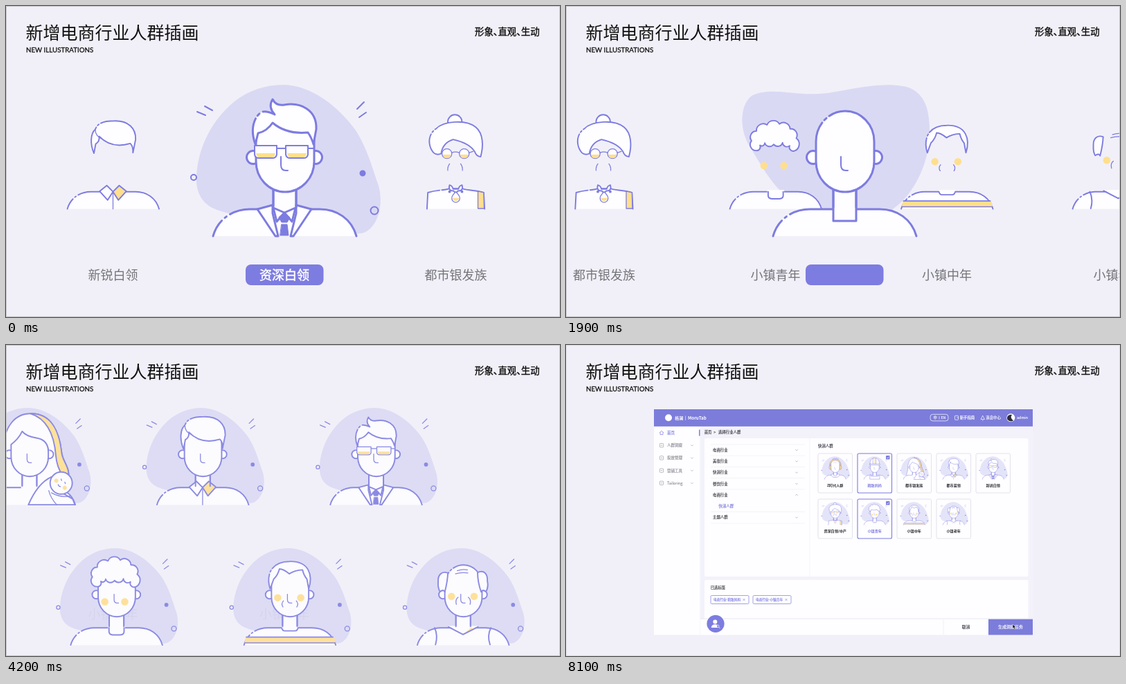
Animation of 800 by 450 pixels, one loop 8.2 s. Source, as an HTML page:

```html
<!DOCTYPE html>
<html lang="zh-CN">
<head>
<meta charset="utf-8">
<title>人群插画</title>
<style>
html, body { margin: 0; width: 100%; height: 100%; overflow: hidden; background: #f1f0f8; }
svg { display: block; width: 800px; height: 450px; }
text { font-family: "Noto Sans CJK SC", "Noto Sans CJK", "Noto Sans", sans-serif; stroke: none; }
.latin { font-family: Lato, sans-serif; }
</style>
</head>
<body>
<svg id="stage" viewBox="0 0 800 450" xmlns="http://www.w3.org/2000/svg"></svg>
<script>
const LOOP = 8200, P = '#7d7ce0', Y = '#ffdf8e', W = '#fefdff';
const clamp = v => Math.max(0, Math.min(1, v));
const inOut = v => v < .5 ? 4 * v ** 3 : 1 - (2 - 2 * v) ** 3 / 2;

// Markup helpers
const path = (d, fill = W, more = '') => `<path d="${d}" fill="${fill}" ${more}/>`;
const flat = (d, fill = W) => path(d, fill, 'stroke="none"');
const line = (d, w = 2) => path(d, 'none', `stroke-width="${w}"`);
const dot = (x, y, r, fill, more = 'stroke="none"') => `<circle cx="${x}" cy="${y}" r="${r}" fill="${fill}" ${more}/>`;
const rect = (x, y, w, h, fill, more = 'stroke="none"') =>
  `<rect x="${x}" y="${y}" width="${w}" height="${h}" fill="${fill}" ${more}/>`;
const text = (x, cy, s, size, fill, more = '') =>
  `<text x="${x}" y="${cy + size * .37}" font-size="${size}" fill="${fill}" ${more}>${s}</text>`;
// Medium weight: regular glyphs with a thin outline
const medium = (x, cy, s, size, fill, more = '') =>
  text(x, cy, s, size, fill, `style="stroke:${fill};stroke-width:${size * .028}" ${more}`);
const use = id => `<use href="#${id}"/>`;
const cheeks = (y, a, b) => dot(a, y, 8.2, Y) + dot(b, y, 8.2, Y);
const scallop = pts => pts.map(([x, y], i) => {
  if (!i) return `M${x},${y}`;
  const r = .56 * Math.hypot(x - pts[i - 1][0], y - pts[i - 1][1]);
  return `A${r},${r} 0 0 1 ${x},${y}`;
}).join('') + 'Z';

const BLOB = 'M400,114C440,114 480,145 505,180C522,206 530,238 538,260C546,290 536,320 517,328' +
  'C485,336 450,308 400,307C360,306 325,304 300,293C280,284 274,265 275,247C277,205 297,165 330,138C350,122 375,114 400,114Z';
const BODY = 'M299,333C306,308 328,294 352,294H453C478,294 499,308 506,333';
const HEAD = 'M361,196A42,44 0 0 1 445,196V225A42,44 0 0 1 361,225Z';
const SPARKS = ['M288,158L276,153', 'M298,151L287,145', 'M507,149L517,139', 'M510,161L520,154'];
const RINGS = [[271, 248, 4, 'none'], [515, 242, 3.5, P], [532, 296, 5.5, '#d9d8f1']];
const PATCH = rect(383.5, 290, 38, 23, W);

const deco = (cls = '') =>
  SPARKS.map(d => path(d, 'none', `stroke-width="2" pathLength="1" class="${cls}"`)).join('') +
  RINGS.map(([x, y, r, f]) => dot(x, y, r, f, `stroke-width="2" class="${cls}"`)).join('');

// wear: clothes; face: hair, glasses, marks; back: hair behind the head
const PEOPLE = [
  { name: 'Z时代人群',
    wear: PATCH + path('M361,295Q366,283 386,279Q402,289 419,279Q440,283 446,295Q430,317 402,317Q376,317 361,295Z') +
      path('M383,281Q386,303 402,303Q419,303 422,281'),
    face: path('M366,168Q368,152 381,147L379,136L390,140L394,130L404,137L417,130L418,139L431,137L428,147Q440,154 441,168Z') +
      flat('M364,186Q366,152 402,152Q440,152 442,186Q402,150 364,186Z') +
      path('M348,203C344,118 462,118 458,203H451C452,134 354,134 355,203Z', Y) +
      path('M361,199V241H356Q344,239 343,219Q344,201 356,199ZM446,199V241H451Q463,239 464,219Q463,201 451,199Z', Y) },
  { name: '都市蓝领',
    wear: path('M356,294V333H450V294H438V305H368V294Z'),
    face: path('M358,187C354,150 376,129 402,129C430,129 450,150 447,187Z') +
      path('M388,131Q402,126 416,131V187H388Z') + flat('M402,130L414.5,132V186H402Z', Y) +
      rect(352, 185, 102, 11, W, 'rx="5.5"') },
  { name: '精致妈妈',
    back: path('M405,127C452,126 470,168 475,215C477,236 496,249 490,278L460,306H343C326,300 329,280 335,266C343,246 340,222 344,196C348,158 368,127 405,127Z') +
      path('M405,127C452,126 470,168 475,215C477,236 496,249 490,278L478,268Q464,248 462,222C458,172 440,138 405,127Z', Y),
    wear: PATCH,
    face: flat('M359,198V178Q362,142 402,142Q444,142 447,178V212Q444,186 418,182Q394,178 386,167Q378,184 359,198Z') +
      line('M361,197Q378,184 386,167Q394,178 418,182Q444,186 445,212', 3) +
      path('M400,333C412,305 430,280 452,270L476,306L500,320L505,333Z') +
      dot(474, 284, 25, W, '') + line('M446,301Q450,318 464,333M452,306Q474,318 496,313') +
      `<g transform="rotate(40 474 284)">${line('M468,277l3,2M479,277l3,2M471,291q4,3 7,0')}${dot(462, 287, 4.5, Y)}${dot(487, 287, 4.5, Y)}</g>` },
  { name: '新锐白领',
    wear: PATCH + path('M388,280L402,294L390,313L372,293Z') + path('M416,280L402,294L414,313L432,293Z', Y) + line('M402,294V333'),
    face: path('M359,207C350,186 351,163 362,153C368,137 385,134 405,134C437,133 454,151 453,176L447,206Q448,192 441,185C414,193 389,188 371,169Q372,181 363,186Z',
      W, 'stroke-dasharray="62 5 4 5 999"') + line('M362,153Q362,168 376,174') },
  { name: '资深白领',
    wear: flat('M385,288L402,298L420,288L434,294L417,333H388L370,294Z') +
      path('M385,288V300L393,333H389L363,294Z') + path('M419,288V300L411,333H415L441,294Z') +
      path('M386,292L402,299L391,312Z') + path('M418,292L402,299L413,312Z') +
      path('M402,299L410,306L406,313H398L394,306ZM398,316H406L408,332H396Z', P, 'stroke-width="1"'),
    face: path('M360,200C353,180 357,160 370,153Q378,152 388,157Q378,146 385,135Q390,145 402,143C425,139 449,150 448,178L444,200Q441,190 436,183Q405,186 385,169Q377,181 364,184Z',
      W, 'stroke-dasharray="38 5 4 6 999"') +
      [359, 404].map(x => path(`M${x},202H${x + 32}V215Q${x + 31},220 ${x + 26},220H${x + 6}Q${x + 1},220 ${x},215Z`, W, 'stroke-width="2"') +
        flat(`M${x + 2},213H${x + 30}Q${x + 29},219 ${x + 24},219H${x + 8}Q${x + 3},219 ${x + 2},213Z`, Y)).join('') +
      line('M391,206H404M436,206H444') },
  { name: '都市银发族', ownBody: true,
    wear: path('M337,333L339,296C362,289 380,291 388,287H416C425,291 445,290 465,296L467,333', W, 'stroke-dasharray="64 5 999"') +
      path('M452,293L465,296L466,332H452Z', Y, 'stroke-width="2"') +
      path('M388,279Q384,293 397,292L402,298L407,292Q420,293 416,279Q410,280 408,288H396Q394,280 388,279Z') +
      path('M402,294Q412,304 411,309A9,9 0 0 1 393,309Q392,304 402,294Z', W, 'stroke-width="2"') +
      flat('M395,308H409A7,7 0 0 1 395,308Z', Y) + dot(388, 294, 3, P) + dot(416, 294, 3, P),
    face: dot(400, 136, 16, W, '') +
      path('M352,206C338,190 339,164 357,152C374,134 425,130 447,148C464,162 465,190 458,215Q448,214 445,204C436,189 414,180 396,176Q372,184 369,208Q359,212 352,206Z',
        W, 'stroke-dasharray="45 5 4 5 999"') +
      [382, 421].map(x => dot(x, 208, 11, W, 'stroke-width="2"') + flat(`M${x - 9.5},210H${x + 9.5}A9.6,9.6 0 0 1 ${x - 9.5},210Z`, Y)).join('') +
      line('M393,206Q401,202 410,206M432,206L441,203M388,231Q383,238 384,246M413,231Q418,238 417,246') },
  { name: '小镇青年',
    wear: PATCH + path('M385.5,294V303Q386,310 394,310H411Q419,310 419.5,303V294'),
    face: path(scallop([[358, 201], [348, 179], [359, 157], [383, 143], [411, 141], [435, 152], [449, 173], [444, 202],
      [434, 190], [418, 183], [398, 187], [378, 184], [367, 189], [358, 201]])) + cheeks(235, 376, 421) },
  { name: '小镇中年',
    wear: PATCH + flat('M303,315H502L506,328H300Z', Y) + line('M304,315H500M301,328H505', 2.5) +
      path('M384,294Q386,301 391,301H414Q419,301 421,294'),
    face: path('M358,206C348,175 360,144 402,144C446,143 455,175 445,206L441,184Q434,176 431,163Q413,164 401,172Q388,161 379,161Q375,176 366,184Z',
      W, 'stroke-dasharray="34 5 4 5 999"') + cheeks(226, 375, 427) + line('M388,233Q382,240 387,247M417,233Q423,240 418,247') },
  { name: '小镇老年',
    wear: PATCH + flat('M369,290L402,309L436,290Z') + flat('M402,309L420,294L428,297L402,311Z', Y) +
      line('M369,292L402,309L436,292M338,294Q346,312 340,332M465,294Q456,312 463,332', 3),
    face: path('M368,170C354,165 345,174 346,190Q345,204 350,212Q359,206 361,213Q367,190 368,170Z') +
      path('M435,169C449,162 458,172 457,188Q460,202 454,212Q446,206 443,213Q435,190 435,169Z') +
      line('M389,165Q400,161 412,163M385,172Q398,168 413,170M391,225Q384,230 387,241M414,225Q421,230 418,241') + cheeks(223, 376, 427) },
];

const defs = `<defs>
<g id="blob">${path(BLOB, P, 'fill-opacity=".2" stroke="none"')}</g>
<g id="deco">${deco()}</g>
<g id="body">${path(BODY, W, 'stroke-dasharray="26 6 3 6 999"')}</g>
<g id="neck">${path('M386,262V311H419V262')}</g>
<g id="head">${dot(357, 219, 9.5, W, '')}${dot(447, 219, 9.5, W, '')}${path(HEAD, W, 'stroke-dasharray="29 5 4 5 999"')}${line('M397,218V230Q397,238 404,238H407')}</g>
${PEOPLE.map((p, i) => `<g id="back${i}">${p.back || ''}</g><g id="wear${i}">${p.wear}</g><g id="face${i}">${p.face}</g>`).join('')}
</defs>`;

const each = fn => PEOPLE.map((p, i) => fn(p, i)).join('');
const bodyOf = p => p.ownBody ? '' : use('body');
const full = (p, i) => `<g id="grid${i}">` + use('blob') + use('deco') + use('back' + i) + bodyOf(p) +
  use('neck') + use('wear' + i) + line('M386,262V291M419,262V291', 3) + use('head') + use('face' + i) + '</g>';

const INK = `fill="${W}" stroke="${P}" stroke-width="3" stroke-linecap="round" stroke-linejoin="round"`;

const carousel = `<g id="carousel" ${INK}>
<g id="aura"><g id="spin">${use('blob')}</g>${deco('deco')}</g>
${each((p, i) => `<g id="side${i}">${bodyOf(p)}${use('wear' + i)}${use('face' + i)}</g>`)}
<g id="hero"><g id="heroBody">${use('body')}</g>${use('neck')}<g id="heroWear"></g>${line('M386,262V291M419,262V291', 3)}${use('head')}<g id="heroFace"></g></g>
</g>
<g id="labels">${each((p, i) => `<g id="label${i}">${text(0, 389, p.name, 18, '#74747a', 'text-anchor="middle" font-weight="300"')}</g>`)}</g>
<g id="pill">${rect(346, 374, 112.5, 30, P, 'rx="8"')}${medium(402, 389, '', 18, '#fff', 'id="pillText" text-anchor="middle"')}</g>`;

// Application window
const CARDS = ['Z时代人群', '精致妈妈', '都市银发族', '都市蓝领', '新锐白领', '资深白领/中产', '小镇青年', '小镇中年', '小镇老年'];
const chevron = (x, y, up) => path(`M${x - 1.7},${y + (up ? .8 : -.8)}l1.7,${up ? -1.7 : 1.7}l1.7,${up ? 1.7 : -1.7}`, 'none', 'stroke="#999" stroke-width=".6"');
const thin = (d, c = '#ebebf2', w = .6) => path(d, 'none', `stroke="${c}" stroke-width="${w}"`);
const white = 'stroke="#fff" stroke-width=".7"';

const menu = ['首页', '人群洞察', '投放管理', '营销工具', 'Tailoring'].map((s, i) => {
  const y = 127 + 18.2 * i, c = i ? '#8d8d96' : P;
  const icon = i ? rect(135.3, y - 2.7, 5.4, 5.4, 'none', `rx="1" stroke="${c}" stroke-width=".6"`) + thin(`M136.8,${y}h2.4`, c)
    : thin(`M135,${y}l3,-2.8l3,2.8M136,${y - .6}v3.2h4v-3.2`, c, .7);
  return icon + medium(146, y, s, 5.5, c) + (i ? chevron(182, y) : '');
}).join('');

const list = ['电商行业', '美妆行业', '快消行业', '餐饮行业', '电商行业', '快消人群', '主题人群'].map((s, i) => {
  const y = 152 + 16.25 * i, sub = i === 5;
  return medium(sub ? 220.5 : 212, y, s, 5.4, sub ? P : '#3c3c44') + (sub ? '' : chevron(333, y, i === 4)) +
    (sub ? '' : thin(`M209,${y - 8.1}H345`));
}).join('');

const cards = CARDS.map((s, i) => {
  const x = 364 + 57 * (i % 5), y = i < 5 ? 157 : 223;
  return `<g id="card${i}">` + rect(x, y, 49.5, 57, W, 'rx="2" stroke="#d6d6e2" stroke-width=".7"') +
    text(x + 24.7, y + 46.5, s, 5.1, '#2b2b33', 'text-anchor="middle" font-weight="700"') + '</g>';
}).join('');

const tag = (id, x, s) => `<g id="${id}">` + rect(x, 362.5, 55, 12, W, `rx="1.5" stroke="${P}" stroke-width=".7"`) +
  medium(x + 4, 368.5, s, 4.7, P) + thin(`M${x + 46.5},${367}l3,3m0,-3l-3,3`, P) + '</g>';

const check = (id, x, y) => `<g id="${id}">` + rect(x, y, 5.5, 5.5, P, 'rx=".8"') +
  path(`M${x + 1.3},${y + 2.8}l1.2,1.2l1.9,-2.3`, 'none', white) + '</g>';

const app = `<g id="app">
${rect(127, 93, 547, 326.5, '#f3f2fa')}${rect(127, 118, 66.5, 301.5, W)}${rect(127, 93, 547, 24.8, '#7c7cdb')}
${dot(148, 105.3, 5, '#fff')}${medium(157, 105.6, '格澜', 6.2, '#fff')}${thin('M172.6,102.5V109', '#fff')}
${text(176, 105.6, 'MoruTab', 6.2, '#fff', 'font-weight="600"')}
${rect(526, 100.3, 26, 9.6, 'none', 'rx="3.5" ' + white)}${medium(530.5, 105.2, '中', 5.2, '#fff')}${thin('M539,102.7V107.6', '#fff')}${medium(541.5, 105.2, 'EN', 5.2, '#fff')}
${rect(561.5, 102.3, 5, 6, 'none', 'rx=".7" ' + white)}${thin('M564,105h3', '#fff')}${medium(568.7, 105.5, '新手指南', 5.4, '#fff')}
${path('M599,107.5L601.7,102.2L604.5,107.5ZM601,109h1.5', 'none', white)}${medium(606.3, 105.5, '消息中心', 5.4, '#fff')}
${dot(642.3, 105.3, 6, '#fff')}${flat('M637.5,108A5.2,5.2 0 0 1 644,101Q640.5,105 646,109.5Q641,112 637.5,108Z', '#2c2c3c')}
${medium(651, 105.3, 'admin', 5.4, '#fff')}
${menu}${rect(192, 122.5, 1.5, 9, P)}
${medium(199.7, 126.3, '首页', 5.4, '#3c3c44')}${medium(213.3, 126.3, '&gt;', 5.4, '#3c3c44')}${medium(220, 126.3, '选择行业人群', 5.4, '#3c3c44')}
${rect(200, 135, 467.5, 200, W, 'rx="2"')}${thin('M352,135V335', '#eeeef5')}${list}${thin('M209,258H345')}
${medium(364, 146, '快消人群', 5.4, '#3c3c44')}${cards}
${rect(200, 340, 467.5, 60, W, 'rx="2"')}${medium(208.7, 351.3, '已选标签', 5.4, '#3c3c44')}
${tag('tag1', 209, '电商行业-精致妈妈')}${tag('tag6', 270, '电商行业-小镇青年')}
${rect(194, 395.5, 480, 1.2, '#e9e8f2')}${rect(194, 396.7, 480, 22.8, W)}${thin('M545,397V419')}
${medium(577.5, 408, '取消', 5.8, '#3c3c44', 'text-anchor="middle"')}
${rect(610, 396.7, 64, 22.8, '#7c7cdb')}${medium(642, 408, '生成洞察任务', 6, '#fff', 'text-anchor="middle"')}
${dot(216, 403.3, 12.6, P)}${dot(215.3, 400.6, 3, '#fff')}${flat('M209.8,409Q210,404.5 215.3,404.3Q219,404.3 219.8,406L218.5,409Z', '#fff')}
${dot(219.3, 406.8, 1.7, P, white)}${thin('M220.6,408.2l1.8,1.8', '#fff', .9)}
</g>`;

const header = text(28.5, 39, '新增电商行业人群插画', 25, '#111') +
  medium(29, 63.6, 'NEW ILLUSTRATIONS', 9.75, '#111', 'class="latin"') +
  ['形象、', '直观、', '生动'].map((s, i) => medium(677 + 33.4 * i, 37.4, s, 13.4, '#111')).join('');

document.getElementById('stage').innerHTML = defs + rect(0, 0, 800, 450, '#f1f0f8') + carousel + app +
  `<g id="grid" ${INK}>${each(full)}</g>` + check('check1', 462, 160) + check('check6', 462, 226) + header +
  `<g id="cursor">${path('M0,0V10.5L2.6,8.2L4.6,12.3L6.4,11.4L4.5,7.5H7.8Z', '#111', 'stroke="#fff" stroke-width=".8"')}</g>` +
  rect(.5, .5, 799, 449, 'none', 'id="edge" stroke="#c6c6ca"');

const el = {};
document.querySelectorAll('[id]').forEach(n => el[n.id] = n);
const decoParts = [...document.querySelectorAll('.deco')];

const set = (id, name, value) => el[id].setAttribute(name, value);
const fade = (id, v) => {
  set(id, 'opacity', clamp(v));
  el[id].style.display = v > 0 ? '' : 'none';
};
const place = (id, x, base, s) => set(id, 'transform', `translate(${x} ${base}) scale(${s}) translate(-402 -332)`);

// Eased interpolation over rows of [time, ...values]
function track(t, keys) {
  const n = keys.findIndex(k => k[0] > t);
  if (n === 0) return keys[0].slice(1);
  if (n < 0) return keys[keys.length - 1].slice(1);
  const a = keys[n - 1], b = keys[n], k = inOut((t - a[0]) / (b[0] - a[0]));
  return a.slice(1).map((v, i) => v + (b[i + 1] - v) * k);
}

const ZOOM_AT = 3600, SLIDE = 400, STARTS = [115, 915, 1715, 2515];
// time, scale, first x of each row, spacing, base line of each row, opacity
const LAYOUT = [
  [ZOOM_AT, 1, -1362, -774, 392, 15, 332, 1],
  [4200, .64, -467, -91, 250.3, 230.5, 433.5, .87],
  [5000, .575, 69.5, 69.5, 225, 201.3, 460.5, .92],
  [5450, .15, 388.7, 388.7, 57, 194, 260, 1],
];
// time, x, y, scale
const POINTER = [
  [5200, 430, 94, 1], [5850, 456, 187, 1], [6350, 456, 187, 1],
  [6750, 450, 252, 1], [7250, 450, 252, 1], [8050, 645, 404, .6],
];

function slideState(t) {
  const s = { pos: 4, spin: 0, who: 4, feat: 1, deco: 1 };
  STARTS.forEach((start, k) => {
    const e = (t - start) / SLIDE, c = clamp(e);
    if (e <= 0) return;
    s.pos = 4 + k + inOut(c);
    s.spin = k < 3 ? 360 * c : 0;
    s.who = 4 + k + (c < .5 ? 0 : 1);
    s.feat = clamp(e < .5 ? 1 - e / .2 : (e - .55) / .3);
    s.deco = clamp(e < .5 ? 1 - e / .2 : (e - .88) / .35);
  });
  return s;
}

function drawCarousel(t) {
  const s = slideState(t), out = t - ZOOM_AT;
  fade('labels', 1 - out / 650);
  fade('pill', 1 - out / 300);
  fade('carousel', 1 - out / 300);
  fade('aura', out < 0 ? 1 : 0);
  fade('hero', out < 0 ? 1 : 0);
  if (out > 650) return;
  set('spin', 'transform', `rotate(${s.spin} 404 215)`);
  decoParts.forEach((n, i) => {
    n.style.display = s.deco > 0 ? '' : 'none';
    if (i < SPARKS.length) n.setAttribute('stroke-dasharray', `${s.deco} 2`);
    else n.setAttribute('r', RINGS[i - SPARKS.length][2] * clamp(s.deco * 2 - 1));
    n.setAttribute('opacity', i < SPARKS.length || s.deco > .5 ? 1 : 0);
  });
  PEOPLE.forEach((p, i) => {
    const d = i - s.pos, x = 402 + 247.5 * d;
    place('side' + i, x, 293, .64);
    fade('side' + i, Math.abs(d) < 2.2 ? (Math.abs(d) - .1) / .25 : 0);
    set('label' + i, 'transform', `translate(${x} 0)`);
  });
  el.heroWear.innerHTML = use('wear' + s.who);
  el.heroFace.innerHTML = use('face' + s.who);
  fade('heroWear', s.feat);
  fade('heroFace', s.feat);
  fade('heroBody', PEOPLE[s.who].ownBody ? 1 - s.feat : 1);
  el.pillText.textContent = PEOPLE[s.who].name;
  fade('pillText', s.feat);
}

function drawGrid(t) {
  fade('grid', t < ZOOM_AT ? 0 : 1);
  if (t < ZOOM_AT) return;
  const [scale, x1, x2, gap, b1, b2, alpha] = track(t, LAYOUT);
  PEOPLE.forEach((p, i) => {
    const top = i < 5;
    place('grid' + i, top ? x1 + gap * i : x2 + gap * (i - 5), top ? b1 : b2, scale);
    fade('grid' + i, i === 8 ? alpha : alpha * clamp((t - ZOOM_AT) / 300));
  });
}

function drawApp(t) {
  const shown = (t - 4550) / 350;
  fade('app', shown);
  fade('cursor', shown);
  const [x, y, s] = track(t, POINTER);
  set('cursor', 'transform', `translate(${x} ${y}) scale(${s})`);
  [[1, 5750, 6550, 6200], [6, 6650, 7500, 7000]].forEach(([i, from, to, click]) => {
    const on = t >= click, hot = on || (t >= from && t < to), [box, label] = el['card' + i].children;
    box.setAttribute('stroke', hot ? P : '#d6d6e2');
    box.setAttribute('stroke-width', on ? 1.1 : .7);
    label.setAttribute('fill', on ? P : '#2b2b33');
    fade('check' + i, on ? 1 : 0);
    fade('tag' + i, on ? 1 : 0);
  });
  set('edge', 'stroke', t < 4900 ? '#c6c6ca' : '#dcdce1');
}

function frame() {
  const t = performance.now() % LOOP;
  drawCarousel(t);
  drawGrid(t);
  drawApp(t);
  requestAnimationFrame(frame);
}
frame();
</script>
</body>
</html>
```
